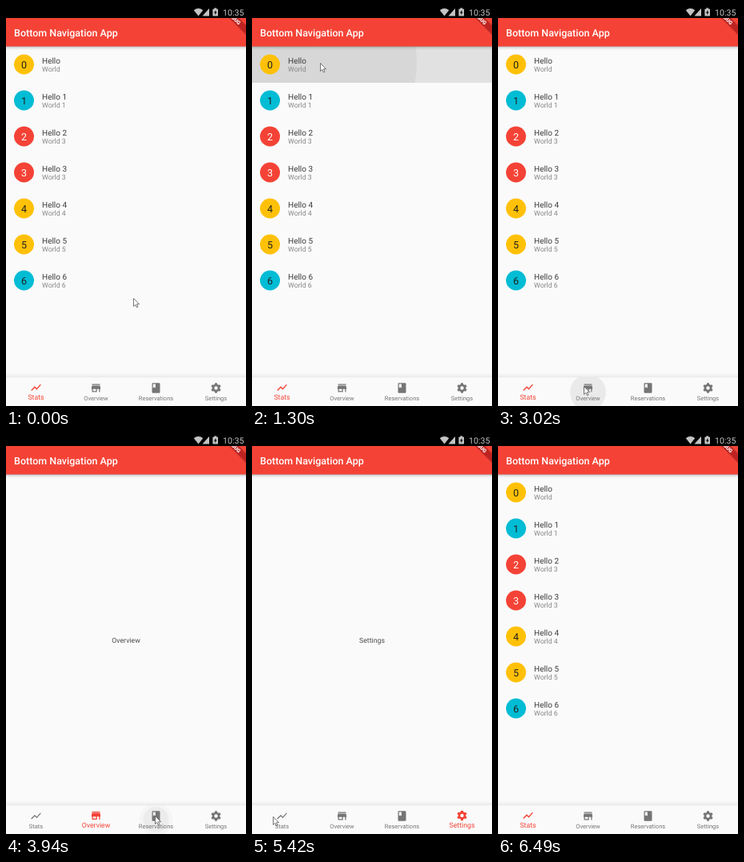
Animation of 300 by 500 pixels, one loop 6.77 s. Source, as an HTML page:

```html
<!DOCTYPE html>
<html lang="en">
<head>
<meta charset="utf-8">
<title>Bottom navigation demo</title>
<style>
  html, body { margin: 0; width: 100%; height: 100%; overflow: hidden; background: #fafafa; }
  svg { display: block; }
  text { font-family: Roboto, "Open Sans", sans-serif; text-rendering: geometricPrecision; }

  .mid { text-anchor: middle; }
  .amber { fill: #ffc107; }
  .cyan { fill: #00bcd4; }
  .red { fill: #f44336; }
  .num { font-size: 12.5px; fill: #212121; text-anchor: middle; }
  .red + .num { fill: #fff; }
  .name { font-size: 10px; fill: #3c3c3c; }
  .sub { font-size: 8.75px; fill: #868686; }
  .body { font-size: 8.75px; fill: #4a4a4a; text-anchor: middle; opacity: 0; }

  /* every animation shares one 6770 ms loop */
  .list, .body { animation: 6770ms step-end infinite; }
  .list { animation-name: list; }
  .overview { animation-name: overview; }
  .reservations { animation-name: reservations; }
  .settings { animation-name: settings; }
  @keyframes list { 0%, 87.3% { opacity: 1 } 45.05% { opacity: 0 } }
  @keyframes overview { 0%, 59.38% { opacity: 0 } 45.05% { opacity: 1 } }
  @keyframes reservations { 0%, 70.31% { opacity: 0 } 59.38% { opacity: 1 } }
  @keyframes settings { 0%, 87.3% { opacity: 0 } 70.31% { opacity: 1 } }

  /* tabs */
  .tab { color: #757575; font-size: 7.5px; fill: currentColor; animation: 6770ms ease-in-out infinite; }
  .tab text { text-anchor: middle; }
  .t0 { animation-name: tab0; }
  .t1 { animation-name: tab1; }
  .t2 { animation-name: tab2; }
  .t3 { animation-name: tab3; }
  @keyframes tab0 {
    0%, 45.05%, 90.25%, 100% { color: #f44336; font-size: 8.75px; transform: translateY(-.6px) }
    48.01%, 87.3% { color: #757575; font-size: 7.5px; transform: none }
  }
  @keyframes tab1 {
    0%, 45.05%, 62.33%, 100% { color: #757575; font-size: 7.5px; transform: none }
    48.01%, 59.38% { color: #f44336; font-size: 8.75px; transform: translateY(-.6px) }
  }
  @keyframes tab2 {
    0%, 59.38%, 73.26%, 100% { color: #757575; font-size: 7.5px; transform: none }
    62.33%, 70.31% { color: #f44336; font-size: 8.75px; transform: translateY(-.6px) }
  }
  @keyframes tab3 {
    0%, 70.31%, 90.25%, 100% { color: #757575; font-size: 7.5px; transform: none }
    73.26%, 87.3% { color: #f44336; font-size: 8.75px; transform: translateY(-.6px) }
  }

  /* tab ripples: a soft halo plus a growing splash */
  .halo, .splash { opacity: 0; transform-box: fill-box; transform-origin: center; animation: 6770ms linear var(--at) infinite; }
  .halo { fill: rgba(188, 188, 188, .1); animation-name: halo; }
  .splash { fill: rgba(200, 200, 200, .2); animation-name: splash; }
  @keyframes halo {
    0% { opacity: 0; transform: scale(.6) }
    1.5%, 2.95% { opacity: 1; transform: none }
    5.9%, 100% { opacity: 0; transform: none }
  }
  @keyframes splash {
    0% { opacity: 1; transform: scale(.2) }
    1.92%, 2.95% { opacity: 1; transform: none }
    5.9%, 100% { opacity: 0; transform: none }
  }

  /* list ripples */
  .rowlight { fill: rgba(188, 188, 188, .4); opacity: 0; animation: rowlight 6770ms linear infinite; }
  .rowsplash { fill: rgba(200, 200, 200, .4); opacity: 0; transform-origin: 85px 71px; animation: rowsplash 6770ms linear infinite; }
  .faint { fill: rgba(200, 200, 200, .06); opacity: 0; animation: faint 6770ms linear infinite; }
  @keyframes rowlight {
    0%, 13.15% { opacity: 0 }
    16.1%, 19.5% { opacity: 1 }
    22.01%, 100% { opacity: 0 }
  }
  @keyframes rowsplash {
    0%, 13.14% { opacity: 0; transform: scale(.1) }
    13.5% { opacity: 1; transform: scale(.14) }
    19.5% { opacity: 1; transform: none }
    22.01%, 100% { opacity: 0; transform: scale(1.8) }
  }
  @keyframes faint {
    0%, 32.5% { opacity: 0 }
    33.5%, 35% { opacity: 1 }
    37.5%, 100% { opacity: 0 }
  }

  .cursor { animation: cursor 6770ms linear infinite; }
  @keyframes cursor {
    0% { transform: translate(159px, 365px) }
    .5% { transform: translate(159px, 365px); animation-timing-function: ease-in-out }
    10.49% { transform: translate(85px, 71px) }
    20.68% { transform: translate(85px, 71px) }
    22.01%, 23.49% { transform: translate(86px, 104px) }
    30.28%, 32.5% { transform: translate(113px, 183px) }
    34.42% { transform: translate(120px, 217px) }
    36.6% { transform: translate(122px, 270px); animation-timing-function: ease-out }
    41.95% { transform: translate(107px, 475px) }
    45.79% { transform: translate(107px, 475px); animation-timing-function: ease-in-out }
    52.14% { transform: translate(185px, 476px) }
    53.62% { transform: translate(186px, 477px) }
    60.27% { transform: translate(186px, 477px); animation-timing-function: ease-in-out }
    66.47% { transform: translate(259px, 477px) }
    74.3% { transform: translate(259px, 477px); animation-timing-function: ease-in-out }
    80.06% { transform: translate(26px, 478px) }
    87.89% { transform: translate(26px, 478px); animation-timing-function: ease-in }
    92.02% { transform: translate(228px, 268px) }
    94.39% { transform: translate(263px, 480px) }
    95.13% { transform: translate(265px, 498px) }
    95.86%, 100% { transform: translate(266px, 510px) }
  }
</style>
</head>
<body>
<svg width="300" height="500" viewBox="0 0 300 500">
  <defs>
    <linearGradient id="drop" x2="0" y2="1">
      <stop stop-color="#000" stop-opacity=".32"/>
      <stop offset=".4" stop-color="#000" stop-opacity=".1"/>
      <stop offset="1" stop-color="#000" stop-opacity="0"/>
    </linearGradient>
    <linearGradient id="lift" x2="0" y2="1">
      <stop stop-color="#000" stop-opacity="0"/>
      <stop offset="1" stop-color="#000" stop-opacity=".07"/>
    </linearGradient>
    <clipPath id="row0"><rect y="50" width="300" height="45.5"/></clipPath>
    <clipPath id="row2"><rect y="140" width="300" height="45"/></clipPath>
    <clipPath id="bar"><rect y="464" width="300" height="36"/></clipPath>
    <path id="tooth" d="M9.9 2h4.2l.7 4h-5.6z"/>
  </defs>

  <rect width="300" height="500" fill="#fafafa"/>

  <g class="list">
    <g clip-path="url(#row0)">
      <rect class="rowlight" y="50" width="300" height="46"/>
      <circle class="rowsplash" cx="85" cy="71" r="126"/>
    </g>
    <g clip-path="url(#row2)"><circle class="faint" cx="114" cy="163" r="114"/></g>

    <g><circle class="amber" cx="22.5" cy="73" r="12.5"/><text class="num" x="22.5" y="77.5">0</text>
      <text class="name" x="45" y="72">Hello</text><text class="sub" x="45" y="82.3">World</text></g>
    <g transform="translate(0 45)"><circle class="cyan" cx="22.5" cy="73" r="12.5"/><text class="num" x="22.5" y="77.5">1</text>
      <text class="name" x="45" y="72">Hello 1</text><text class="sub" x="45" y="82.3">World 1</text></g>
    <g transform="translate(0 90)"><circle class="red" cx="22.5" cy="73" r="12.5"/><text class="num" x="22.5" y="77.5">2</text>
      <text class="name" x="45" y="72">Hello 2</text><text class="sub" x="45" y="82.3">World 3</text></g>
    <g transform="translate(0 135)"><circle class="red" cx="22.5" cy="73" r="12.5"/><text class="num" x="22.5" y="77.5">3</text>
      <text class="name" x="45" y="72">Hello 3</text><text class="sub" x="45" y="82.3">World 3</text></g>
    <g transform="translate(0 180)"><circle class="amber" cx="22.5" cy="73" r="12.5"/><text class="num" x="22.5" y="77.5">4</text>
      <text class="name" x="45" y="72">Hello 4</text><text class="sub" x="45" y="82.3">World 4</text></g>
    <g transform="translate(0 225)"><circle class="amber" cx="22.5" cy="73" r="12.5"/><text class="num" x="22.5" y="77.5">5</text>
      <text class="name" x="45" y="72">Hello 5</text><text class="sub" x="45" y="82.3">World 5</text></g>
    <g transform="translate(0 270)"><circle class="cyan" cx="22.5" cy="73" r="12.5"/><text class="num" x="22.5" y="77.5">6</text>
      <text class="name" x="45" y="72">Hello 6</text><text class="sub" x="45" y="82.3">World 6</text></g>
  </g>

  <text class="body overview" x="150" y="261">Overview</text>
  <text class="body reservations" x="150" y="261">Reservations</text>
  <text class="body settings" x="150" y="261">Settings</text>

  <!-- app bar -->
  <rect y="50" width="300" height="5" fill="url(#drop)"/>
  <rect y="15" width="300" height="35.5" fill="#f44336"/>
  <text x="10" y="38" font-size="12.5" font-weight="500" fill="#fff">Bottom Navigation App</text>
  <g transform="translate(300 0) rotate(45)">
    <rect x="-26" y="16.7" width="52" height="9.1" fill="#000" opacity=".15"/>
    <rect x="-25" y="17.5" width="50" height="7.5" fill="#b71c1c" opacity=".75"/>
    <text class="mid" y="23.6" font-size="6.4" font-weight="900" fill="#fff">DEBUG</text>
  </g>

  <!-- status bar -->
  <rect width="300" height="15" fill="#000"/>
  <g fill="#c4c4c4">
    <path d="M240.5 12.5L234.8 5.2Q240.5 1 246.2 5.2z"/>
    <path d="M254 3v9.5h-8.5z"/>
    <path d="M260.2 2.5h3v1.2h1.8v8.8h-6.6v-8.8h1.8z"/>
    <path d="M262.3 5l-2.3 3.7h1.4v2.5l2.2-3.7h-1.3z" fill="#000"/>
    <text x="271" y="11.6" font-size="10.6">10:35</text>
  </g>

  <!-- bottom bar -->
  <rect y="459" width="300" height="5.5" fill="url(#lift)"/>
  <rect y="464.5" width="300" height="35.5" fill="#fafafa"/>
  <g clip-path="url(#bar)">
    <g style="--at: 2890ms"><circle class="halo" cx="112.5" cy="483" r="22.5"/><circle class="splash" cx="112.5" cy="483" r="22.5"/></g>
    <g style="--at: 3860ms"><circle class="halo" cx="187.5" cy="482" r="22.5"/><circle class="splash" cx="187.5" cy="482" r="22.5"/></g>
    <g style="--at: 4600ms"><circle class="halo" cx="262.5" cy="483" r="22.5"/><circle class="splash" cx="262.5" cy="483" r="22.5"/></g>
    <g style="--at: 5750ms"><circle class="halo" cx="37.5" cy="483" r="22.5"/><circle class="splash" cx="37.5" cy="483" r="22.5"/></g>
  </g>
  <g class="tab t0">
    <path transform="translate(30 470) scale(.625)" d="M3.5 18.49l6-6.01 4 4L22 6.92l-1.41-1.41-7.09 7.97-4-4L2 16.99z"/>
    <text x="37.5" y="493">Stats</text>
  </g>
  <g class="tab t1">
    <path transform="translate(105 470) scale(.625)" d="M20 4H4v2h16V4zm1 10v-2l-1-5H4l-1 5v2h1v6h10v-6h4v6h2v-6h1zm-9 4H6v-4h6v4z"/>
    <text x="112.5" y="493">Overview</text>
  </g>
  <g class="tab t2">
    <path transform="translate(180 470) scale(.625)" d="M18 2H6c-1.1 0-2 .9-2 2v16c0 1.1.9 2 2 2h12c1.1 0 2-.9 2-2V4c0-1.1-.9-2-2-2zM6 4h5v8l-2.5-1.5L6 12V4z"/>
    <text x="187.5" y="493">Reservations</text>
  </g>
  <g class="tab t3">
    <g transform="translate(255 470) scale(.625)">
      <circle cx="12" cy="12" r="5.6" fill="none" stroke="currentColor" stroke-width="4.2"/>
      <use href="#tooth"/>
      <use href="#tooth" transform="rotate(60 12 12)"/>
      <use href="#tooth" transform="rotate(120 12 12)"/>
      <use href="#tooth" transform="rotate(180 12 12)"/>
      <use href="#tooth" transform="rotate(240 12 12)"/>
      <use href="#tooth" transform="rotate(300 12 12)"/>
    </g>
    <text x="262.5" y="493">Settings</text>
  </g>

  <g class="cursor">
    <path d="M.5.5v10l2.3-2.1 1.6 3.4 1.6-.7-1.6-3.4h3.1z" fill="#fff" stroke="#555" stroke-width=".8"/>
  </g>
</svg>
</body>
</html>
```
